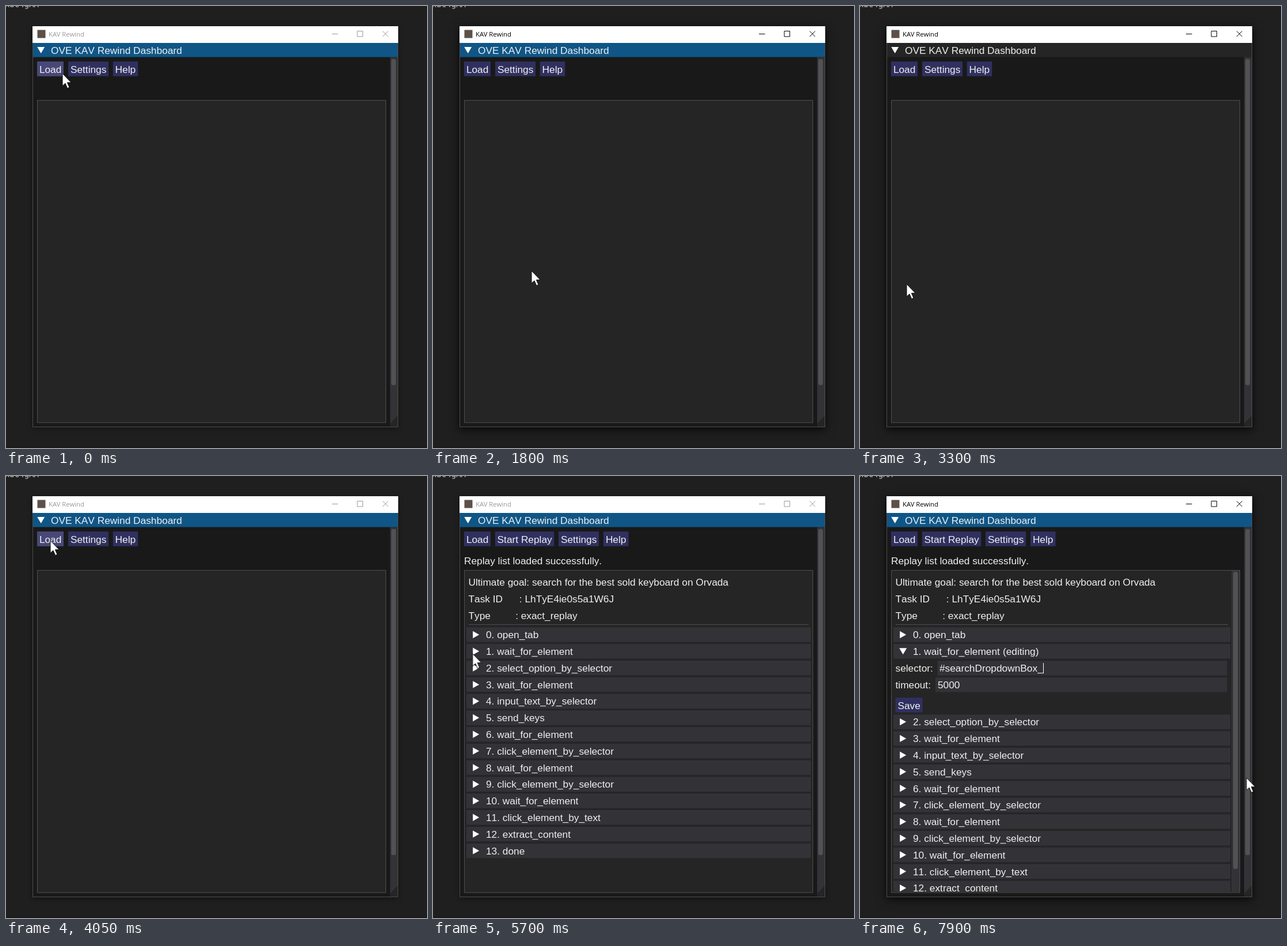
Animation of 731 by 766 pixels, one loop 8 s. Source, as an HTML page:

```html
<!DOCTYPE html>
<html lang="en">
<head>
<meta charset="utf-8">
<title>Rewind dashboard</title>
<style>
  html, body { margin: 0; width: 100%; height: 100%; overflow: hidden; background: #1f1f1f; }
  svg { display: block; width: 100%; height: 100%; }
  text { font: 17.3px "Liberation Sans", Arial, sans-serif; font-kerning: none; white-space: pre; fill: #f0f0f0; }
  .caption { font: 11.3px "Open Sans", "Noto Sans", sans-serif; fill: currentColor; }
  .stray { font: 14px "DejaVu Sans Mono", monospace; fill: #c4c4c4; }
  .hint { fill: #979797; }
  .shadow { filter: drop-shadow(0 2px 5px rgba(0, 0, 0, .4)); }
  .deep { filter: drop-shadow(0 5px 9px rgba(0, 0, 0, .5)); }
</style>
</head>
<body>
<svg id="stage" viewBox="0 0 731 766"></svg>
<script>
const LOOP = 8000;
const PANEL = '#252526', FRAME = '#333337', LINE = '#4e4e4e', GRAB = '#525255';
const BLUE = '#0f5687', HOVER = '#225376', BUTTON = '#303060', BUTTON_HOVER = '#484878';
const stage = document.getElementById('stage');

// ---- drawing helpers
function add(parent, tag, attrs = {}, content = '') {
  const node = document.createElementNS('http://www.w3.org/2000/svg', tag);
  for (const key in attrs) node.setAttribute(key, attrs[key]);
  node.textContent = content;
  return parent.appendChild(node);
}
const group = (parent, attrs) => add(parent, 'g', attrs);
const rect = (parent, x, y, width, height, fill, more) =>
  add(parent, 'rect', { x, y, width, height, fill, ...more });
const outline = (parent, x, y, w, h, fill = 'none') =>
  rect(parent, x + .5, y + .5, w - 1, h - 1, fill, { stroke: LINE });
const path = (parent, d, more) => add(parent, 'path', { d, fill: 'none', ...more });
const hline = (parent, x1, x2, y) => path(parent, `M${x1} ${y}H${x2}`, { stroke: LINE });
// Labels are placed by the vertical middle of their capitals.
const label = (parent, x, middle, content, more) =>
  add(parent, 'text', { x, y: middle + 6.2, ...more }, content);
const arrowDown = (parent, x, y) => path(parent, `M${x - 6.5} ${y - 5.5}h13l-6.5 11z`, { fill: '#fff' });
const arrowRight = (parent, x, y) => path(parent, `M${x - 5.5} ${y - 6.2}v12.4l11-6.2z`, { fill: '#fff' });

// ---- timing helpers
function animate(node, prop, steps, easing = 'step-end') {
  const frames = steps.map(([time, value]) => ({ offset: time / LOOP, [prop]: value, easing }));
  frames.push({ offset: 1, [prop]: steps.at(-1)[1] });
  node.animate(frames, { duration: LOOP, iterations: Infinity });
  return node;
}
function show(node, ...ranges) {
  const steps = ranges[0][0] > 0 ? [[0, 0]] : [];
  for (const [from, to] of ranges) {
    steps.push([from, 1]);
    if (to < LOOP) steps.push([to, 0]);
  }
  return animate(node, 'opacity', steps);
}
function button(parent, x, y, width, content, ...hovers) {
  rect(parent, x, y, width, 25.5, BUTTON);
  if (hovers.length) show(rect(parent, x, y, width, 25.5, BUTTON_HOVER), ...hovers);
  label(parent, x + 3.9, y + 13.2, content);
}

// ---- desktop and window chrome
rect(stage, 0, 0, 731, 766, '#1f1f1f');
rect(stage, 730, 0, 1, 766, '#191919');
rect(stage, 0, 764, 731, 2, '#1a1819');
add(stage, 'text', { x: -2, y: 2, class: 'stray' }, 'xbc4gAA');

rect(stage, 46, 35, 635, 695, '#191919', { class: 'shadow' });
show(rect(stage, 46, 35, 635, 695, '#191919', { class: 'deep' }), [400, 4000], [6000, LOOP]);
rect(stage, 46, 35, 635, 29, '#fff');
const chrome = group(stage);
animate(chrome, 'color', [[0, '#999'], [400, '#000'], [4000, '#999'], [6000, '#000']]);
rect(chrome, 54.5, 41.5, 14, 14, '#5d5048');
add(chrome, 'text', { x: 74, y: 53, class: 'caption' }, 'KAV Rewind');
path(chrome, 'M566 48.5h10.5M610 43.5h9.5v9.5h-9.5zM654 43.5l9.5 9.5m0-9.5l-9.5 9.5', { stroke: 'currentColor' });

const header = rect(stage, 46, 64, 635, 24.5, PANEL);
animate(header, 'fill', [[0, BLUE], [400, PANEL], [1750, BLUE], [2450, PANEL], [3345, BLUE]]);
arrowDown(stage, 60.7, 76.5);
label(stage, 78, 76.6, 'OVE KAV Rewind Dashboard');

rect(stage, 667, 88.5, 13.5, 640.5, FRAME);
rect(stage, 669, 92, 8, 565, GRAB, { rx: 3 });
path(stage, 'M681 709v21h-20z', { fill: PANEL });
rect(stage, 661, 723, 6, 6, '#191919');
path(stage, 'M46.5 64V729.5H680.5V64', { stroke: LINE });
outline(stage, 54, 163, 606, 559.5, PANEL);

// ---- toolbar
const LOADED = 5250, EXPANDED = 6100, EDITING = 6900;
button(stage, 54, 96.2, 46, 'Load', [0, 60], [3650, 4100]);
const emptyBar = show(group(stage), [0, LOADED]);
button(emptyBar, 108, 96.2, 70, 'Settings', [130, 400]);
button(emptyBar, 185.7, 96.2, 43.5, 'Help', [2200, 2450]);
const loaded = show(group(stage), [LOADED, LOOP]);
button(loaded, 107.7, 96.2, 102.5, 'Start Replay');
button(loaded, 218, 96.2, 70, 'Settings');
button(loaded, 296, 96.2, 43.5, 'Help');
label(loaded, 54, 147, 'Replay list loaded successfully.');

// ---- replay list
const ACTIONS = ['open_tab', 'wait_for_element', 'select_option_by_selector', 'wait_for_element',
  'input_text_by_selector', 'send_keys', 'wait_for_element', 'click_element_by_selector',
  'wait_for_element', 'click_element_by_selector', 'wait_for_element', 'click_element_by_text',
  'extract_content', 'done'];
const clip = add(stage, 'clipPath', { id: 'listClip' });
rect(clip, 55, 164, 604, 557.5);
const list = group(loaded, { 'clip-path': 'url(#listClip)' });
label(list, 61.5, 183.7, 'Ultimate goal: search for the best sold keyboard on Orvada');
label(list, 61.5, 212.5, 'Task ID      : LhTyE4ie0s5a1W6J');
label(list, 61.5, 241.3, 'Type         : exact_replay');

function drawRows(parent, width, openIndex, openHeight, hover) {
  hline(parent, 62, 54 + width, 257.5);
  ACTIONS.forEach((action, i) => {
    const middle = 275 + 28.8 * i + (i > openIndex ? openHeight : 0);
    rect(parent, 58, middle - 12.7, width, 25.4, FRAME, { rx: 1 });
    if (i === 1) show(rect(parent, 58, middle - 12.7, width, 25.4, HOVER), hover);
    (i === openIndex ? arrowDown : arrowRight)(parent, 74.7, middle);
    label(parent, 92, middle, `${i}. ${action}`);
  });
}
drawRows(show(group(list), [LOADED, EXPANDED]), 598, -1, 0, [5740, EXPANDED]);
const expanded = show(group(list), [EXPANDED, LOOP]);
drawRows(expanded, 585, 1, 93.5, [EXPANDED, 6290]);
rect(expanded, 645, 164, 14, 558, FRAME);
rect(expanded, 648, 166, 8, 515, GRAB, { rx: 3 });

const reading = show(group(expanded), [EXPANDED, EDITING]);
label(reading, 61.5, 333, 'selector: #searchDropdownBox');
label(reading, 61.5, 361.8, 'timeout: 5000');
button(reading, 61.5, 384.2, 37.5, 'Edit', [6790, EDITING]);

const editing = show(group(expanded), [EDITING, LOOP]);
label(editing, 248, 303.8, '(editing)');
label(editing, 61.5, 333, 'selector:');
rect(editing, 134.5, 320.3, 503, 25.4, FRAME);
label(editing, 138, 333, '#searchDropdownBox');
show(label(editing, 308.3, 333, '_'), [7890, LOOP]);
label(editing, 61.5, 361.8, 'timeout:');
rect(editing, 131, 349.1, 506.5, 25.4, FRAME);
label(editing, 135, 361.8, '5000');
button(editing, 61.5, 384.2, 47, 'Save', [EDITING, 6990]);
const caret = show(rect(editing, 308, 324, 1, 18, '#fff'), [7200, LOOP]);
animate(caret, 'transform', [[0, 'translate(0px)'], [7890, 'translate(10px)']]);

// ---- dialogs
const dim = rect(stage, 46, 64, 635, 666, 'rgba(37,37,38,.59)');
animate(dim, 'opacity', [[0, 0], [400, 0], [570, 1], [1650, 1], [1750, 0],
  [2450, 0], [2620, 1], [3200, 1], [3300, 0]], 'linear');

function dialog(x, y, width, height, title, range) {
  const box = show(group(stage), range);
  rect(box, x, y, width, height, PANEL);
  rect(box, x, y, width, 24, BLUE);
  outline(box, x, y, width, height);
  label(box, x + 4.3, y + 12.5, title);
  path(box, `M${x + width - 20.5} ${y + 6}l12 12m0-12l-12 12`, { stroke: '#fff', 'stroke-width': 1.2 });
  return box;
}

const keys = dialog(140, 160.5, 538, 403, 'API Key Settings', [420, 1650]);
label(keys, 147, 206, 'Model provider:');
rect(keys, 147, 221.5, 167, 25.5, FRAME);
rect(keys, 314, 221.5, 25, 25.5, BUTTON);
show(rect(keys, 314, 221.5, 25, 25.5, '#424278'), [750, 1350]);
arrowDown(keys, 326.7, 234);
label(keys, 151, 234.5, 'ostre');
hline(keys, 147, 671, 250.5);
label(keys, 147, 269, 'Saved keys:');
outline(keys, 147, 283, 524, 29.5);
path(keys, 'M348.5 283v29', { stroke: LINE });
rect(keys, 151, 285.5, 193, 25, FRAME);
label(keys, 155, 298, 'OSTRE_API_KEY');
rect(keys, 353, 285.5, 197, 25, FRAME);
label(keys, 357, 298, 'sk-proj-Pdkz7YEF36K2a');
button(keys, 554, 285.2, 47, 'Save');
button(keys, 608.5, 285.2, 34, 'Del');
hline(keys, 147, 671, 316.5);
label(keys, 147, 335, 'Add new key:');
rect(keys, 147, 349, 173, 25.5, FRAME);
label(keys, 151, 361.8, 'KEY name', { class: 'hint' });
rect(keys, 328, 349, 230.5, 25.5, FRAME);
label(keys, 332, 361.8, 'KEY value', { class: 'hint' });
button(keys, 566, 348.7, 39, 'Add');
button(keys, 147, 435, 52, 'Close', [1520, 1650]);

const menu = show(group(keys), [940, 1150]);
outline(menu, 147, 247, 192, 103, PANEL);
rect(menu, 148, 276, 190, 22.5, HOVER);
['marthoben', 'ostre', 'kudeni', 'tivara'].forEach((name, i) => label(menu, 151, 264.6 + 23.1 * i, name));

const help = dialog(49, 160.5, 538, 334, 'Help', [2470, 3200]);
['Load: open a saved replay list.',
 'Start Replay: run the loaded steps in order.',
 'Settings: add, change or remove API keys.',
 'Edit: change the values of a single step.'].forEach((line, i) => label(help, 56, 206 + 28.8 * i, line));
button(help, 56, 458, 52, 'Close', [3060, 3200]);

// ---- pointer
show(path(stage, 'M-5 388.5H2M-5 410.5H2', { stroke: '#fff', 'stroke-width': 2 }), [5140, 5190]);
const pointer = show(group(stage), [0, 4140], [5190, LOOP]);
const arrow = path(pointer, 'M0 0V21.5L4.9 17L8.6 25.5L12 24L8.4 15.7H15.2Z', { fill: '#fff', stroke: '#111' });
const ROUTE = [
  [0, 98, 117], [50, 98, 117], [200, 146, 112], [450, 146, 112], [800, 214, 233], [1000, 214, 233],
  [1100, 206, 286], [1300, 206, 286], [1550, 171, 459], [1800, 171, 459], [2100, 206, 153],
  [2150, 206, 153], [2300, 207, 114], [2550, 207, 114], [3100, 81, 482], [3300, 81, 482],
  [3700, 77, 112], [4050, 77, 112], [4150, 52, 112], [5190, 10, 397], [5800, 72, 303],
  [6250, 72, 303], [6550, 76, 412], [6750, 76, 412], [6850, 82, 398], [6950, 82, 398],
  [7150, 316, 334], [7250, 316, 334], [7400, 678, 628], [7550, 679, 515], [7650, 671, 523]
];
animate(arrow, 'transform', ROUTE.map(([t, x, y]) => [t, `translate(${x}px, ${y}px)`]), 'ease-in-out');
</script>
</body>
</html>
```
